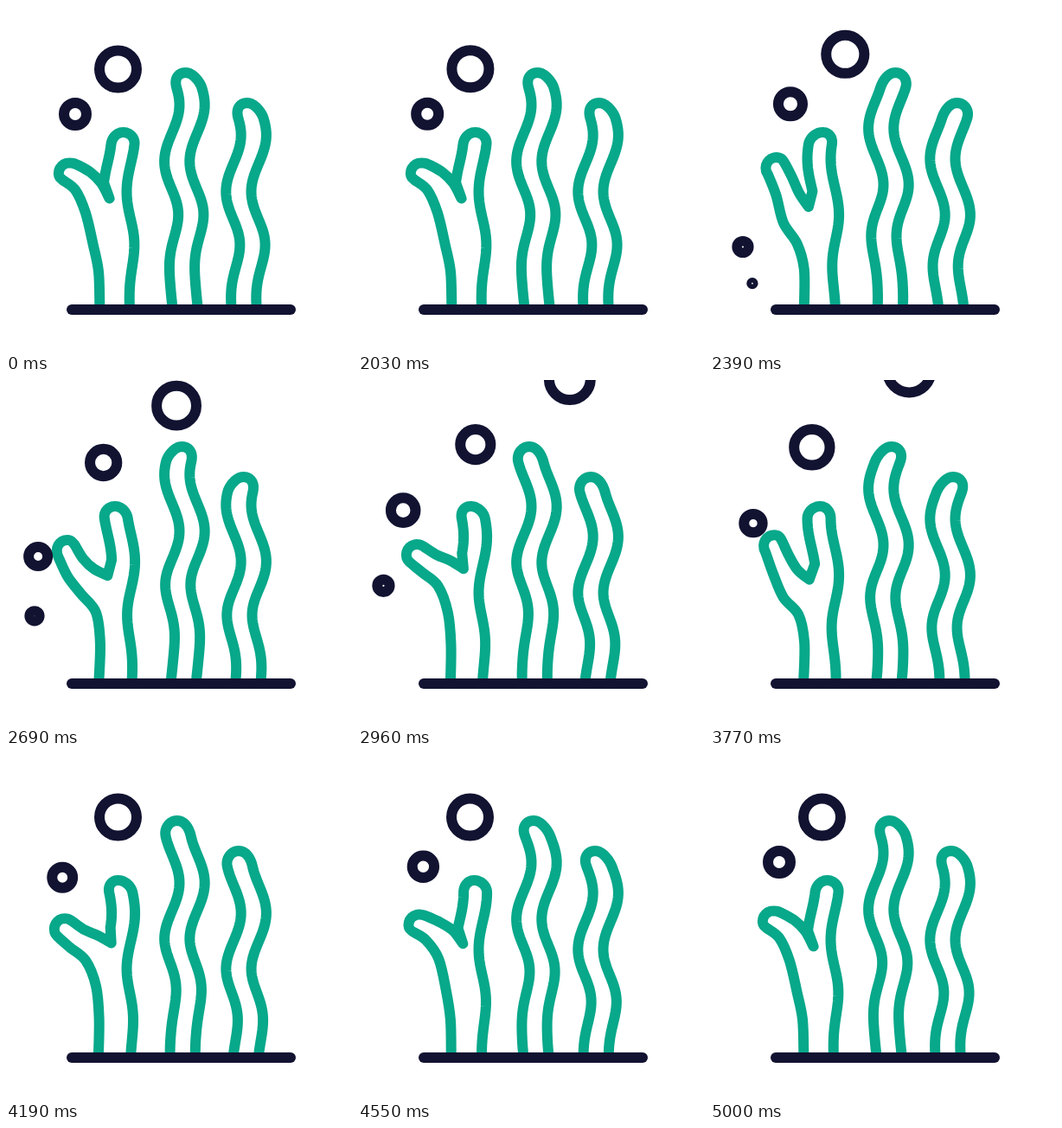
These frames come from a looping animation (400 by 400 pixels, 5.03 s). An HTML page with a canvas:

```html
<!DOCTYPE html>
<html lang="en">
<head>
<meta charset="utf-8">
<title>Seaweed</title>
<style>
  html, body { margin: 0; width: 100%; height: 100%; overflow: hidden; background: #fff; }
  canvas { display: block; width: 400px; height: 400px; }
</style>
</head>
<body>
<canvas id="stage"></canvas>
<script>
const GREEN = '#08a88a', NAVY = '#121331';
const LOOP = 5030, REST = 2030, STEP = 30;
const LINE = 12, FLOOR = 347, TAU = Math.PI * 2;

const canvas = document.getElementById('stage');
const ctx = canvas.getContext('2d');
const scale = window.devicePixelRatio || 1;
canvas.width = canvas.height = 400 * scale;
ctx.scale(scale, scale);
ctx.lineJoin = 'round';

const mix = (a, b, u) => a + (b - a) * u;

function strokePath(color, width = LINE) {
  ctx.strokeStyle = color;
  ctx.lineWidth = width;
  ctx.stroke();
}

// Two wave cycles: steady speed, then a slow stop.
function cycles(t) {
  const speed = 1.22, brake = 0.64;
  if (t < brake) return 2 * speed * t;
  const u = (t - brake) / (1 - brake);
  return 2 * (1 - (1 - speed * brake) * (1 - u) ** 2);
}

// Wave running from root to tip. Depth counts from the tip; the tip itself
// moves almost rigidly and the swing fades towards the root.
function sway(depth, phase, size, hold = 130, fadeLength = 125) {
  const u = Math.min(1, Math.max(0, (depth - hold) / fadeLength));
  const fade = 1 - 0.75 * u * u * (3 - 2 * u);
  const d = Math.hypot(Math.max(0, depth), 8);
  return size * fade * Math.cos(TAU * ((d - 38) / 130 + phase));
}

// A tube open at the bottom: up the left side from y = start, over the tip, down the right.
function tube(cx, top, rx, ry, start, offset) {
  const put = (x, y) => ctx.lineTo(x + offset(y), y);
  const shoulder = top + ry;
  for (let y = start; y > shoulder; y -= 3) put(cx - rx, y);
  for (let i = 0; i <= 24; i++) {
    const a = Math.PI * (1 + i / 24);
    put(cx + rx * Math.cos(a), shoulder + ry * Math.sin(a));
  }
  for (let y = shoulder + 3; y < FLOOR; y += 3) put(cx + rx, y);
  put(cx + rx, FLOOR);
}

function weed(cx, top, phase) {
  ctx.beginPath();
  tube(cx, top, 14.6, 18, FLOOR, y => sway(y - top, phase, 8.7));
  strokePath(GREEN);
}

function smoothLine(pts) {
  ctx.moveTo(...pts[0]);
  for (let i = 0; i < pts.length - 1; i++) {
    const p = pts[i], q = pts[i + 1];
    const before = pts[i - 1] || p, after = pts[i + 2] || q;
    ctx.bezierCurveTo(
      p[0] + (q[0] - before[0]) / 6, p[1] + (q[1] - before[1]) / 6,
      q[0] - (after[0] - p[0]) / 6, q[1] - (after[1] - p[1]) / 6,
      q[0], q[1]);
  }
}

// Side branch of the coral: stem, round tip, straight edge down to the fork.
function branchOutline() {
  const pts = [[108, 347], [108, 305], [102, 272], [89, 244], [76, 220]];
  const cx = 72.5, cy = 194.5, r = 12.2, fork = [118, 225];
  for (let i = 0; i <= 6; i++) {
    const a = Math.PI * (0.75 + i / 6);
    pts.push([cx + r * Math.cos(a), cy + r * Math.sin(a)]);
  }
  const edge = pts[pts.length - 1];
  for (let i = 1; i <= 3; i++) {
    pts.push([mix(edge[0], fork[0], i / 3), mix(edge[1], fork[1], i / 3)]);
  }
  return pts;
}
const branch = branchOutline();

function coral(phase) {
  // The branch leans at 45 degrees, so its depth runs along the diagonal.
  const pts = branch.map(([x, y]) => {
    const shift = sway((x - 65 + y - 190) * Math.SQRT1_2, phase, 9, 50, 60);
    return [x + 0.5 * shift, y - 0.87 * shift];
  });
  const fork = pts[pts.length - 1];
  ctx.beginPath();
  smoothLine(pts);
  tube(130.8, 146, 13.5, 14, fork[1] - 18, y => sway(y - 112, phase, 4.8));
  strokePath(GREEN);
}

// Each spot holds a resting bubble, which drifts off while a new one rises to replace it.
const SEABED = [60, 343], BEND = [7, 245];
const spots = [
  { rest: [129.5, 73], radius: 21.5, born: 5, docked: 70, bend: [40, 104], away: [215, -138], swell: 4.6 },
  { rest: [80, 125], radius: 13, born: 9, docked: 97, bend: [29, 182], away: [104, -94], swell: 8.5 }
];

function ring(x, y, r, width = LINE) {
  ctx.beginPath();
  ctx.arc(x, y, r, 0, TAU);
  strokePath(NAVY, width);
}

function leave({ rest, radius, away, swell }, step) {
  const u = (step / 47) ** 1.62;
  ring(rest[0] + away[0] * u, rest[1] + away[1] * u, radius + swell * u);
}

function rise({ rest, radius, born, docked, bend }, step) {
  const age = step - born;
  if (age <= 0) return;
  const v = Math.min(1, age / (docked - born));
  const u = 1 - (1 - v) ** 1.75, w = 1 - u;
  const [x, y] = [0, 1].map(i =>
    SEABED[i] * w ** 3 + 3 * BEND[i] * w * w * u + 3 * bend[i] * w * u * u + rest[i] * u ** 3);
  ring(x, y, mix(3, radius, u), Math.min(LINE, age * 1.45));
}

function draw(ms) {
  const time = ms % LOOP;
  const step = time < REST ? 0 : Math.floor((time - REST) / STEP) + 1;
  const phase = cycles(Math.max(0, step - 1) / 100);

  ctx.fillStyle = '#fff';
  ctx.fillRect(0, 0, 400, 400);
  coral(phase);
  weed(206.4, 77, phase);
  weed(277.6, 112, phase);
  for (const spot of spots) {
    leave(spot, step);
    rise(spot, step);
  }

  ctx.lineCap = 'round';
  ctx.beginPath();
  ctx.moveTo(76, 351);
  ctx.lineTo(329, 351);
  strokePath(NAVY);
  ctx.lineCap = 'butt';
}

const start = performance.now();
function tick() {
  draw(performance.now() - start);
  requestAnimationFrame(tick);
}
tick();
</script>
</body>
</html>
```
